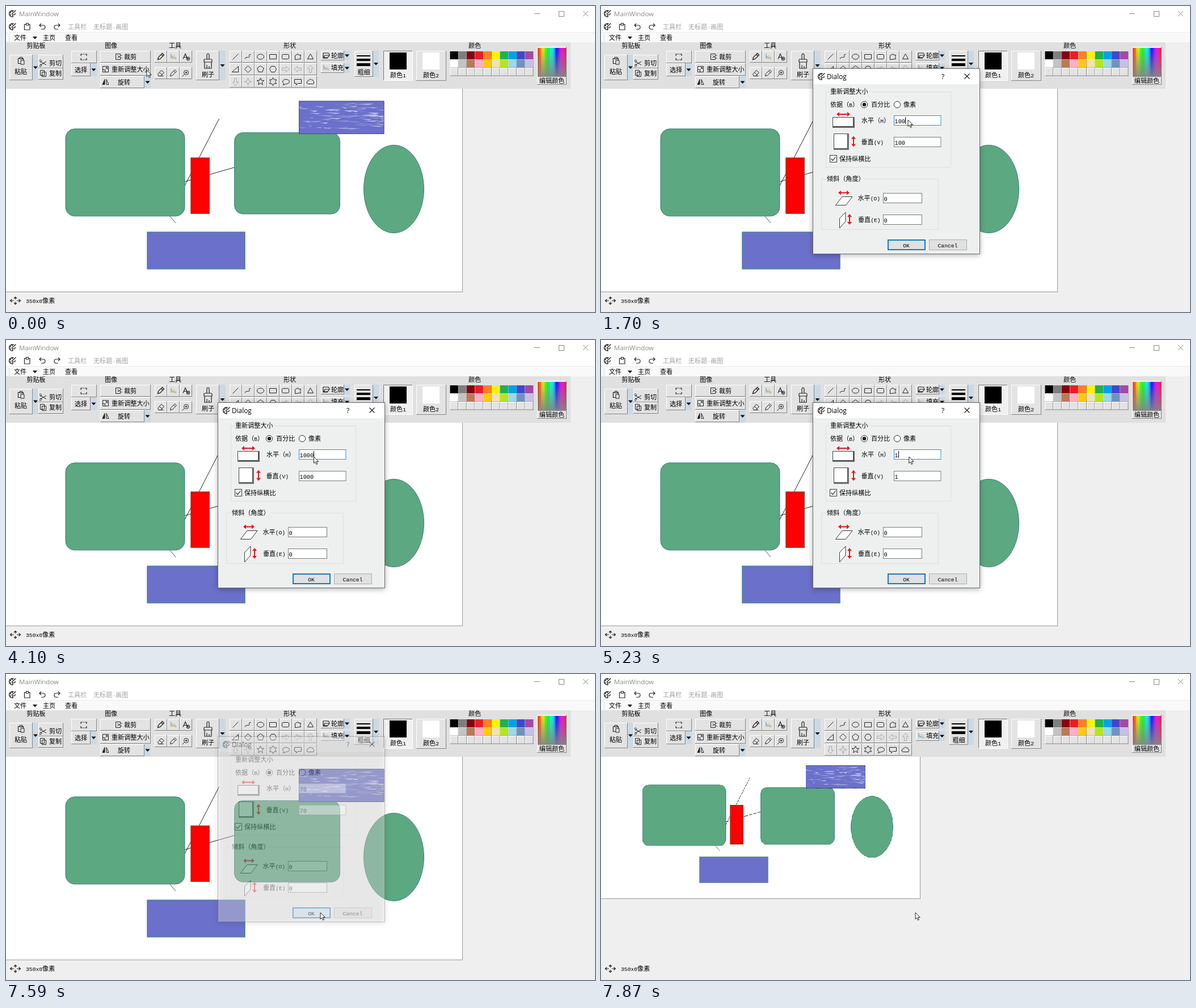
Write an HTML page with a canvas that moves like this. It is 1038x540 px and loops after 8 s.

```html
<!DOCTYPE html>
<html lang="zh-CN">
<head>
<meta charset="utf-8">
<style>
html, body { margin: 0; width: 100%; height: 100%; overflow: hidden; }
canvas { display: block; }
</style>
</head>
<body>
<canvas id="stage" width="1038" height="540"></canvas>
<script>
const W = 1038, H = 540, LOOP = 8000;
const CJK = '"Noto Sans CJK SC", "Noto Sans CJK JP", "Noto Sans CJK", sans-serif';
const MONO = '"Liberation Mono", monospace';
const SANS = '"Open Sans", "Noto Sans", sans-serif';
const stage = document.getElementById('stage').getContext('2d');
let g = stage; // context being drawn on

function layer(w, h, draw) {
  const c = document.createElement('canvas');
  c.width = w;
  c.height = h;
  g = c.getContext('2d');
  draw();
  g = stage;
  return c;
}

function rect(x, y, w, h, fill, stroke, width = 1) {
  if (fill) { g.fillStyle = fill; g.fillRect(x, y, w, h); }
  if (stroke) {
    g.strokeStyle = stroke;
    g.lineWidth = width;
    g.strokeRect(x + width / 2, y + width / 2, w - width, h - width);
  }
}

function path(d, x = 0, y = 0, stroke = '#222', fill = null, width = 1) {
  const p = new Path2D(d);
  g.save();
  g.translate(x, y);
  if (fill) { g.fillStyle = fill; g.fill(p); }
  if (stroke) { g.strokeStyle = stroke; g.lineWidth = width; g.stroke(p); }
  g.restore();
}

function label(s, x, y, font, color = '#000') {
  g.font = font;
  g.fillStyle = color;
  g.fillText(s, x, y + 4);
  return g.measureText(s).width;
}

// Wide and narrow runs use different fonts; centred when align is 0.5.
function text(s, x, y, align = 0, color = '#000') {
  const runs = s.match(/[ -~]+|[^ -~]+/g);
  const font = r => r[0] <= '~' ? '9.7px ' + MONO : '11.1px ' + CJK;
  const width = runs.reduce((sum, r) => (g.font = font(r), sum + g.measureText(r).width), 0);
  x -= width * align;
  for (const r of runs) x += label(r, x, y, font(r), color);
}

function button(x, y, w, h, pressed) {
  const [a, b] = pressed ? ['#777', '#fff'] : ['#fff', '#858585'];
  rect(x, y, w, h, pressed ? '#f0f0f0' : '#e3e3e3');
  rect(x, y, w, 1, a);
  rect(x, y, 1, h, a);
  rect(x, y + h - 1, w, 1, b);
  rect(x + w - 1, y, 1, h, b);
}

const triangle = (x, y) => path('M-4 -2H4L0 2.5Z', x, y, null, '#000');

function drop(x, y, w, h) {
  rect(x, y, w, h, '#cad9e5');
  triangle(x + w / 2, y + h / 2);
}

function poly(n, r, inner = r, turn = -Math.PI / 2) {
  const pts = [];
  for (let i = 0; i < n; i++) {
    const a = turn + i * 2 * Math.PI / n, q = i % 2 ? inner : r;
    pts.push((q * Math.cos(a)).toFixed(2) + ' ' + (q * Math.sin(a)).toFixed(2));
  }
  return 'M' + pts.join('L') + 'Z';
}

function random(seed) {
  return () => (seed = seed * 16807 % 2147483647) / 2147483647;
}

function paletteIcon(x, y) {
  path('M3 -5A6 5.5 0 1 0 1 5.5Q2 4 0 3Q0 1 3 2Q6 2 5 -1M-1 1L6.5 -6', x, y, '#222', null, 1.3);
  for (const [a, b] of [[-3, -2], [0, -4], [-3.5, 2]]) rect(x + a - 1, y + b - 1, 2, 2, '#222');
}

const CLIPBOARD = 'M-2 -4H-5V5H4V-4H1M-2 -6H2V-3H-2Z';
const PENCIL = 'M-5 5L-4 1L3 -6L6 -3L-1 4ZM1 -4L4 -1';
const ARROW_R = 'M-6 -2H1V-5L7 0L1 5V2H-6Z';

function bucket(x, y) {
  path('M-4 -5V2M-3 0L5 4', x, y, '#8db4dd', null, 2);
  path('M-6 3H4M0 -3L5 2', x, y, '#e0c594', null, 1.5);
}

function shapeButtons() {
  const round = 'M-4 -4H4Q6 -4 6 -2V2Q6 4 4 4H-4Q-6 4 -6 2V-2Q-6 -4 -4 -4Z';
  const shapes = [
    'M-5 5L5 -5', 'M-5 4Q-6 1 0 1Q4 1 2 -2Q1 -4 5 -4', 'M-6 0A6 4.5 0 1 0 6 0A6 4.5 0 1 0 -6 0',
    'M-6 -4H6V4H-6Z', round, 'M-5 5V-2L0 -5L1 -3H5L4 1L5 4Z', 'M0 -5L5 4H-5Z',
    'M5 -5V5H-6Z', poly(4, 6), poly(5, 6), poly(6, 6, 6, 0), ARROW_R,
    'M6 -2H-1V-5L-7 0L-1 5V2H6Z', 'M-2 6V-1H-5L0 -7L5 -1H2V6Z',
    'M-2 -6V1H-5L0 7L5 1H2V-6Z', poly(8, 7, 2.2), poly(10, 6.5, 2.9), poly(12, 7, 4),
    'M-3 3A6 4 0 1 1 1 4L-4 6Z', 'M-6 -4H6V3H0L-3 6V3H-6Z',
    'M-4 4Q-8 3 -6 0Q-5 -2 -3 -2Q-1 -6 2 -3Q5 -4 5 -1Q8 1 5 4Z'
  ];
  shapes.forEach((d, i) => {
    const x = 404 + i % 7 * 22, y = 89.5 + Math.floor(i / 7) * 22;
    button(x - 10, y - 10.5, 22, 21);
    path(d, x + .5, y, i > 10 && i < 16 ? '#aaa' : '#222');
  });
}

function colours() {
  const list = ('000 7f7f7f 880015 ed1c24 ff7f27 fff200 22b14c 00a2e8 3f48cc a349a4 ' +
    'fff c3c3c3 b97a57 ffaec9 ffc90e efe4b0 b5e61d 99d9ea 7092be c8bfe7').split(' ');
  for (let i = 0; i < 30; i++) {
    const x = 782.5 + i % 10 * 14.7, y = 80 + Math.floor(i / 10) * 14.5;
    button(x, y, 14.7, 14.5);
    if (list[i]) rect(x, y, 14.2, 14, '#' + list[i]);
  }
  button(936, 72, 52, 67);
  const rnd = random(9);
  for (let i = 0; i < 50; i++) {
    const fade = g.createLinearGradient(0, 74, 0, 125);
    const hue = (i * 7.2 + rnd() * 24 - 12 + 360) % 360;
    fade.addColorStop(0, `hsl(${hue} 92% 52%)`);
    fade.addColorStop(.4 + rnd() * .2, `hsl(${hue} 48% 52%)`);
    fade.addColorStop(1, `hsl(${hue} 6% 52%)`);
    rect(937 + i, 74, 1, 51, fade);
  }
  text('编辑颜色', 962, 131.5, .5);
}

function drawWindow() {
  rect(0, 0, W, H, '#efefef');
  rect(0, 0, W, 64, '#fff');
  rect(0, 47, W, 17, '#f9f9f9');
  rect(0, 46, W, 1, '#ebebeb');
  rect(0, 64, 995, 82, '#e0e0e0');

  paletteIcon(11, 13.5);
  paletteIcon(11, 36.5);
  label('MainWindow', 23, 14, '11.5px ' + SANS, '#8a8a8a');
  path('M931 13.5H941M974.5 9.5H983.5V18.5H974.5ZM1017 9L1026 18M1026 9L1017 18', 0, 0, '#888');
  path('M35 32.5H32.5V42H42V32.5H39.5M35.5 30.5H39.5V34H35.5Z', 0, 0, '#222', null, 1.2);
  path('M62 31L59 34L62 37M59 34H66Q69 34 69 37.5Q69 41 65 41H62', 0, 0, '#222', null, 1.2);
  path('M92 31L95 34L92 37M95 34H88Q85 34 85 37.5Q85 41 89 41H92', 0, 0, '#222', null, 1.2);
  for (let y = 50; y < 63; y += 3) rect(5, y, 1, 1, '#aaa');
  text('文件', 14, 56);
  triangle(51, 56);
  text('主页', 65, 56);
  text('查看', 104, 56);
  [['剪贴板', 53], ['图像', 185], ['工具', 298], ['形状', 500], ['颜色', 826]]
    .forEach(([s, x]) => text(s, x, 70, .5));

  // clipboard
  button(6, 86, 41, 45);
  path(CLIPBOARD, 26.5, 96.5, '#222', null, 1.2);
  path('M0 -1H6V6H0Z', 26, 97, '#222', '#e3e3e3');
  text('粘贴', 26, 116, .5);
  drop(47, 86, 10, 45);
  button(57, 86, 44, 24);
  path('M-6 -4L6 3M-6 4L6 -3M-6 -5A2 2 0 1 1 -5 -2M-6 5A2 2 0 1 0 -5 2', 65, 101);
  text('剪切', 76, 101);
  button(57, 110, 44, 20);
  path('M-5 -5H2V4H-5ZM-2 -2H5V6H-2Z', 65.5, 118.5);
  text('复制', 76, 119);

  // image
  button(115, 79, 45, 22);
  path('M-5 -2V-5H-2M2 -5H5V-2M5 2V5H2M-2 5H-5V2M-1 -5H1M-1 5H1', 137, 90, '#222', null, 1.2);
  button(115, 101, 34, 23);
  text('选择', 132, 112.5, .5);
  drop(149, 101, 11, 23);
  button(166, 79, 89, 21);
  path('M-5 -5H3V-2M-5 -5V5H3V2M-2 -2L6 3M-2 2L6 -3', 198.5, 89.5);
  text('裁剪', 219, 89.5, .5);
  button(166, 101, 89, 22);
  path('M-5 -5H5V5H-5ZM-5 1H-1V5M0 0L3 -3M0 -3H3V0', 175.5, 111.5);
  text('重新调整大小', 186, 112);
  button(166, 124, 78, 21);
  path('M-2 -5V4H-6ZM1 -5V4H5Z', 176, 134.5, '#222');
  path('M-2 -5V4H-6Z', 176, 134.5, null, '#222');
  text('旋转', 208, 134.5, .5);
  drop(244, 124, 11, 21);

  // tools
  for (const y of [79, 108]) for (const x of [262, 284, 306]) button(x, y, 22, 21);
  path(PENCIL, 272.5, 89.5, '#222', null, 1.3);
  bucket(295, 89.5);
  path('M-6 4L-2 -5L2 4M-4 1H0', 318, 89.5, '#222', null, 1.2);
  path('M0 3A3 3 0 1 0 6 3A3 3 0 1 0 0 3M1 3H5M3 1V5', 318, 90);
  path('M-5 2L1 -5L6 -1L0 5H-3ZM-2 -1L3 3M-4 5H5', 272.5, 118.5);
  path(PENCIL, 294.5, 118.5);
  path('M-3 -1A4 4 0 1 0 5 -1A4 4 0 1 0 -3 -1M-2 2L-6 6M-1 -1H3M1 -3V1', 316.5, 118.5);

  // brush
  button(335, 79, 41, 52);
  path('M-2 -3V-11Q0 -15 2 -11V-3M-6 -3H6Q7 -3 7 -1V2H-7V-1Q-7 -3 -6 -3ZM-6 2V13H6V2M-2 13V7M2 13V9',
    356, 97, '#222', null, 1.2);
  text('刷子', 356, 120.5, .5);
  drop(376, 79, 11, 52);

  shapeButtons();

  // outline, fill and width
  button(555, 79, 41, 17);
  path('M-5 -4H4L6 -1M-5 -4V5H3M-2 0H6L3 4H-4Z', 564, 87, '#222', null, 1.2);
  text('轮廓', 573, 87.5);
  drop(596, 79, 10, 17);
  button(555, 101, 41, 17);
  bucket(564, 109);
  text('填充', 573, 109);
  drop(596, 101, 10, 17);
  button(614, 79, 33, 46);
  rect(618, 87, 24, 2, '#000');
  rect(618, 93, 24, 4, '#000');
  rect(618, 101, 24, 5, '#000');
  text('粗细', 630.5, 117, .5);
  drop(647, 79, 10, 46);

  button(665, 79, 52, 53, true);
  rect(676, 82, 30, 30, '#000');
  text('颜色1', 691, 121.5, .5);
  button(723, 79, 53, 53);
  rect(734, 82, 30, 30, '#fff');
  text('颜色2', 749, 121.5, .5);
  colours();

  path('M-8 0H8M0 -6V6M-6 -2.5L-9 0L-6 2.5M6 -2.5L9 0L6 2.5M-2.5 -4L0 -6.5L2.5 -4M-2.5 4L0 6.5L2.5 4',
    16.5, 520, '#222', null, 1.2);
  rect(14, 518, 5, 4, '#efefef');
  text('350x0像素', 35, 520);
}

// The picture on the paper, which starts at y = 146.
function drawPicture() {
  const green = '#5ca880', blue = '#6b70cb', edge = '#3a7f80';
  rect(0, 0, 804, 359, '#fff');
  g.translate(0, -146);
  path('M375.5 199L315 317M315 310L402 285', 0, 0, '#222');
  path('M288 370L299 383', 0, 0, '#555');
  const rounded = (x, y, w, h, r) => {
    g.beginPath();
    g.roundRect(x, y, w, h, r);
    g.fillStyle = green;
    g.fill();
    g.lineWidth = 1;
    g.strokeStyle = edge;
    g.stroke();
  };
  rounded(105, 216.8, 210, 154, 16);
  rounded(402.6, 223.4, 185.8, 143.6, 15);
  path('M630.5 323A53 77.5 0 1 0 736.5 323A53 77.5 0 1 0 630.5 323Z', 0, 0, edge, green);
  rect(325.5, 267.6, 33.5, 99, '#f00', '#6b4a35');
  rect(248.5, 398.5, 173, 66, blue, '#3d8c80');

  rect(516, 167.5, 150.5, 58.5, blue);
  g.save();
  g.beginPath();
  g.rect(517, 168, 149, 57);
  g.clip();
  const rnd = random(77);
  for (let i = 0; i < 90; i++) {
    const x = 510 + rnd() * 155, y = 172 + rnd() * 44, len = 6 + rnd() * 28, drift = rnd() * 3 - 1.5;
    path(`M0 0L${len} ${drift}L${len * .7} ${drift + 1 + rnd() * 1.6}Z`, x, y, null,
      `rgba(255,255,255,${.15 + rnd() * .5})`);
  }
  g.restore();
  g.setLineDash([2, 1]);
  rect(516, 167.5, 150.5, 58.5, null, '#30345c');
  g.setLineDash([]);
}

// Red double arrow of length n centred on x, y.
function arrow(x, y, n, vertical) {
  const e = n / 2, s = e - 5;
  g.save();
  g.translate(x, y);
  if (vertical) g.rotate(Math.PI / 2);
  path(`M${-e} 0L${-s} -4V-1H${s}V-4L${e} 0L${s} 4V1H${-s}V4Z`, 0, 0, null, '#e8141c');
  g.restore();
}

function field(x, y, w, value, focused) {
  rect(x, y, w, 18, '#fff', focused ? '#2a8cda' : '#7a7a7a');
  label(value, x + 1.5, y + 9.5, '10.3px ' + MONO);
}

function group(x, y, w, h, title, tx, tw) {
  rect(x, y, w, h, null, '#dcdfdf');
  rect(tx - 2, y - 2, tw, 5, '#eef0f0');
  text(title, tx, y);
}

function radio(x, y, on) {
  const dot = r => `M${-r} 0A${r} ${r} 0 1 0 ${r} 0A${r} ${r} 0 1 0 ${-r} 0`;
  path(dot(5.7), x, y, '#333', '#fff');
  if (on) path(dot(3.3), x, y, null, '#222');
}

function drawDialog() {
  rect(373, 110, 295, 328, '#eef0f0', '#6a6a6a');
  rect(374, 111, 293, 27, '#fff');
  paletteIcon(388, 124.5);
  label('Dialog', 398, 125, '11.8px ' + SANS);
  label('?', 600, 125, '12px ' + SANS);
  path('M640.5 119.5L649.5 128.5M649.5 119.5L640.5 128.5', 0, 0, '#111', null, 1.1);

  group(396, 151, 221, 134, '重新调整大小', 404, 70);
  text('依据（B）', 404, 174);
  radio(464, 174, true);
  text('百分比', 476, 174);
  radio(522, 174);
  text('像素', 533, 174);
  arrow(427, 191, 24);
  rect(408, 196, 39, 19, '#666');
  rect(408, 196, 37, 17, '#fff', '#444');
  text('水平（H）', 459, 202);
  rect(410, 225, 27, 29, '#777');
  rect(410, 225, 25, 27, '#fff', '#444');
  arrow(445, 239, 19, true);
  text('垂直(V)', 458.5, 239.5);
  rect(403, 263, 13, 13, '#fff', '#333');
  path('M405.5 269.5L408.5 272.5L413.5 266', 0, 0, '#222', null, 1.2);
  text('保持纵横比', 420, 270);

  group(388, 305, 207, 90, '倾斜（角度）', 398, 68);
  arrow(428, 329.5, 20);
  path('M413.5 351.5L425 336.5H443L431.5 351.5Z', 0, 0, '#333', '#fff');
  text('水平(O)', 452.5, 339);
  field(497, 330, 69, '0');
  path('M420.5 375L431 364V380L420.5 392Z', 0, 0, '#333', '#fff');
  arrow(438, 376.5, 19, true);
  text('垂直(E)', 453, 377);
  field(497, 368, 69, '0');
  rect(505, 412, 67, 19, '#e1e1e1', '#0f78c8', 2);
  text('OK', 538, 422, .5);
  rect(578, 412, 67, 19, '#e1e1e1', '#adadad');
  text('Cancel', 611, 422, .5);
}

const windowLayer = layer(W, H, drawWindow);
const picture = layer(804, 359, drawPicture);
const dialogLayer = layer(W, H, drawDialog);

const typing = [
  [0, '100'], [1700, '100'], [3760, '1000'], [4630, '100'], [4890, '10'],
  [5090, '1'], [5830, ''], [6230, '7'], [6370, '70']
];
const route = [
  [0, 248, 113], [70, 248, 113], [270, 244.5, 108], [820, 244.5, 108], [1080, 420, 190],
  [1240, 532, 228], [1370, 541, 201], [2760, 541, 201], [3230, 542, 206], [3960, 542, 206],
  [4100, 542.5, 206], [6230, 543, 206], [6400, 505, 203], [6570, 525, 206], [6980, 541, 254],
  [7080, 562, 340], [7190, 554, 421], [LOOP, 554, 421]
];

function pointer(t) {
  const i = route.findIndex(p => p[0] > t), [t0, x0, y0] = route[i - 1], [t1, x1, y1] = route[i];
  const k = (t - t0) / (t1 - t0);
  path('M0 0V11.5L2.7 9L4.5 13.5L6.4 12.6L4.6 8.4H8.3Z',
    x0 + (x1 - x0) * k, y0 + (y1 - y0) * k, '#222', '#fff');
}

function paper(k) {
  const w = Math.round(804 * k), h = Math.round(359 * k);
  g.imageSmoothingEnabled = false;
  g.drawImage(picture, 0, 146, w, h);
  rect(w, 146, 1, h, '#999');
  rect(0, 145 + h, w + 1, 1, '#999');
}

function dialog(t) {
  const alpha = Math.min(1, (t - 400) / 180, (7670 - t) / 210);
  if (t < 470 || alpha <= 0) return;
  g.save();
  g.globalAlpha = alpha;
  g.shadowColor = 'rgba(0,0,0,.3)';
  g.shadowBlur = 10;
  g.shadowOffsetY = 2;
  g.drawImage(dialogLayer, 0, 0);
  g.shadowColor = 'transparent';
  const [time, value] = typing.filter(k => k[0] <= t).pop();
  const focused = t >= 1630;
  field(516, 193, 83.5, value, focused);
  field(516, 231, 83.5, value);
  if (focused && t < 7390 && (t - time) % 1060 < 530) rect(518 + value.length * 6, 196, 1, 12, '#000');
  if (t >= 7390) {
    rect(505, 412, 67, 19, '#cce4f7', '#005499');
    text('OK', 538, 422, .5);
  }
  g.restore();
}

const start = performance.now();
function frame() {
  const t = (performance.now() - start) % LOOP;
  g.drawImage(windowLayer, 0, 0);
  const ink = t >= 470 && t < 680 ? '#000' : '#a0a0a0';
  text('工具栏', 109, 36.5, 0, ink);
  text('无标题-画图', 154, 36.5, 0, ink);
  paper(t < 7800 ? 1 : .699);
  dialog(t);
  pointer(t);
  requestAnimationFrame(frame);
}
frame();
</script>
</body>
</html>
```
